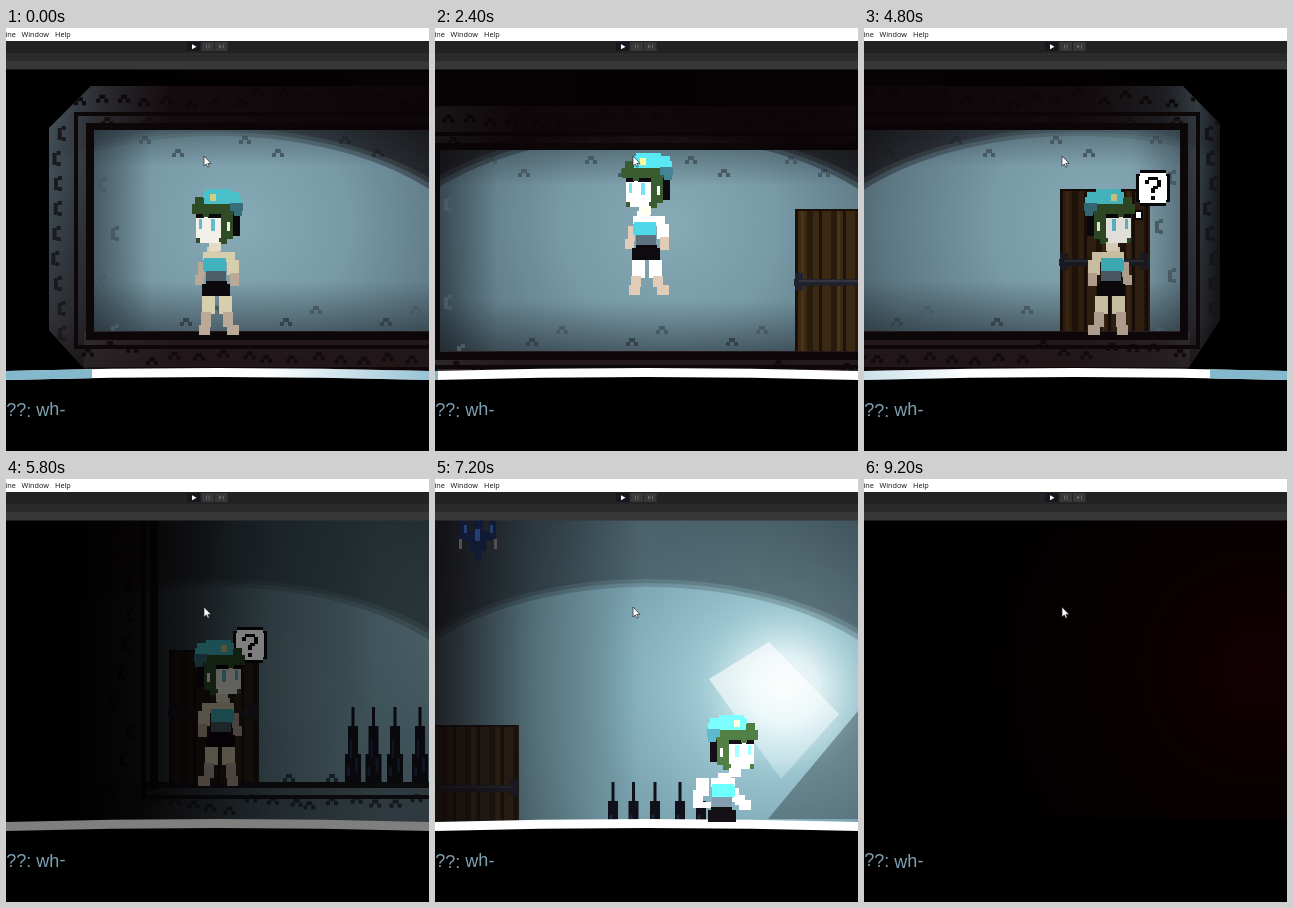
Animation of 423 by 423 pixels, one loop 9400 ms. Source, as an HTML page with a canvas:

```html
<!DOCTYPE html>
<html lang="en">
<head>
<meta charset="utf-8">
<style>
  html, body { margin: 0; width: 100%; height: 100%; overflow: hidden; background: #000; }
  canvas, svg { position: absolute; left: 0; top: 0; width: 423px; height: 423px; }
  .menu { font: 7.3px "Open Sans", sans-serif; fill: #111; }
  .talk { font: 18px "Liberation Sans", Arial, sans-serif; fill: #7f9fb1; }
</style>
</head>
<body>
<canvas id="stage" width="423" height="423"></canvas>
<svg viewBox="0 0 423 423">
  <rect width="423" height="13" fill="#fff"/>
  <g class="menu">
    <text x="-.5" y="9">ine</text><text x="15.5" y="9">Window</text><text x="49" y="9">Help</text>
  </g>
  <rect y="13" width="423" height="12" fill="#222"/>
  <rect y="25" width="423" height="8" fill="#2b2b2b"/>
  <rect y="33" width="423" height="8.5" fill="#373737"/>
  <path d="M181 14h13v9h-13z" fill="#17171f"/>
  <path d="M195.500 14h12.500v9h-12.500zM209 14h12.500v9h-12.500z" fill="#383838"/>
  <path d="M186 16.300l4.500 2.500-4.500 2.500z" fill="#fff"/>
  <path d="M200 16.500h1v4h-1zM202.500 16.500h1v4h-1zM213 16.500l3 2-3 2zM217 16.500h1v4h-1z" fill="#666"/>
  <text id="talk" class="talk" x="0.300" y="388">??: wh-</text>
  <path d="M198 128v10l2.300-2 1.500 3.200 1.500-.7-1.500-3.100h3.200z" fill="#fff" stroke="#222" stroke-width=".7"/>
</svg>
<script>
const LOOP = 9400, STEP = 200, SIZE = 423;
const ctx = document.getElementById('stage').getContext('2d');
const talk = document.getElementById('talk');
const clamp = v => Math.max(0, Math.min(1, v));
const noise = n => { const s = Math.sin(n * 127.1 + 11.7) * 43758.5; return s - Math.floor(s); };

// linear keys: time, value, time, value...
function key(t, ...k) {
  if (t <= k[0]) return k[1];
  for (let i = 2; i < k.length; i += 2)
    if (t <= k[i]) return k[i - 1] + (k[i + 1] - k[i - 1]) * (t - k[i - 2]) / (k[i] - k[i - 2]);
  return k[k.length - 1];
}

// filled boxes: x, y, w, h, repeated
function box(color, ...n) {
  ctx.fillStyle = color;
  for (let i = 0; i < n.length; i += 4) ctx.fillRect(n[i], n[i + 1], n[i + 2], n[i + 3]);
}

function stops(g, list) {
  list.forEach(([at, color]) => g.addColorStop(at, color));
  return g;
}
const across = (x0, x1, ...list) => stops(ctx.createLinearGradient(x0, 0, x1, 0), list);
const down = (y0, y1, ...list) => stops(ctx.createLinearGradient(0, y0, 0, y1), list);
const glow = (x, y, r, ...list) => stops(ctx.createRadialGradient(x, y, 0, x, y, r), list);

function poly(color, ...p) {
  ctx.fillStyle = color;
  ctx.beginPath();
  for (let i = 0; i < p.length; i += 2) ctx.lineTo(p[i], p[i + 1]);
  ctx.fill();
}

function brick(x, y, color) {
  box(color, x - 3, y - 4, 6, 4, x - 6, y, 4, 4, x + 2, y, 4, 4);
}

function sideBrick(x, y, color) {
  box(color, x - 4, y - 6, 4, 12, x, y - 8, 4, 4, x, y + 3, 4, 4);
}

// darkness above the wide oval of light
function shade(left, right, tint) {
  for (const k of [1, 0.975, 0.95]) {
    ctx.fillStyle = across(0, SIZE, [0, `rgba(${tint},${left})`], [0.5, `rgba(${tint},${(left + right) * 0.35})`],
      [1, `rgba(${tint},${right})`]);
    ctx.beginPath();
    ctx.rect(0, 40, SIZE, 310);
    ctx.ellipse(212, 257, 290 * k, 157 * k, 0, 0, 7);
    ctx.fill('evenodd');
  }
}

function door(x, floor, h, dim) {
  const y = floor - h;
  box('#3f2b15', x, y, 88, h);
  for (let i = 0; i < 8; i++) box(i % 2 ? '#2a1b0d' : '#1e130a', x + i * 12, y, i % 2 ? 6 : 3, h);
  box('#4e3719', x + 6, y, 3, h, x + 42, y, 3, h, x + 67, y, 3, h);
  box('#1b1009', x, y, 88, 2, x, y, 2, h, x + 86, y, 2, h);
  const m = floor - 69;
  box('#24242e', x - 1, m - 3, 90, 7, x, m - 9, 8, 17, x + 80, m - 9, 8, 17);
  box('#363945', x + 4, m - 2, 80, 2);
  box(`rgba(8,2,3,${dim})`, x, y, 88, h);
}

function firstRoom(L, C) {
  const T = 102 + C, F = 303 + C, R = L + 475;
  ctx.save();
  ctx.beginPath();
  [[-45, -2], [-3, -44], [478, -44], [515, -6], [515, 190], [478, 246], [-3, 246], [-45, 200]]
    .forEach(([x, y]) => ctx.lineTo(L + x, T + y));
  ctx.clip();
  box(across(L - 45, R + 40, [0, '#4a5a63'], [0.1, '#303238'], [0.22, '#190e11'], [0.75, '#170d10'],
    [0.9, '#23252a'], [0.96, '#3b474e'], [1, '#181c20']), L - 45, T - 44, 560, 290);
  box(down(T - 44, F + 44, [0, 'rgba(0,0,0,0)'], [0.35, 'rgba(0,0,0,.15)'], [0.8, 'rgba(18,4,6,.45)'],
    [1, 'rgba(12,3,4,.75)']), L - 45, T - 44, 560, 290);
  box('rgba(94,84,88,.22)', L - 10, F, 495, 36);

  for (let i = 0; i < 24; i++) {
    const x = L - 20 + i * 23 + noise(i) * 8;
    brick(x, T - 25 - noise(i + 40) * 14, '#100a0d');
    brick(x + 8, F + 13 + noise(i + 80) * 20, '#120b0e');
    if (i % 2) brick(x + 5, T - 9, '#1a1114');
  }
  for (let i = 0; i < 9; i++) {
    sideBrick(L - 29 - noise(i + 9) * 10, T + 4 + i * 25, '#1b1a1f');
    sideBrick(R + 27 + noise(i + 5) * 8, T + 4 + i * 25, '#15151a');
  }
  ctx.strokeStyle = '#0d0709';
  ctx.lineWidth = 8;
  ctx.strokeRect(L - 4, T - 3, 483, 209);
  ctx.lineWidth = 4;
  ctx.strokeRect(L - 18, T - 16, 511, 233);

  ctx.save();
  ctx.beginPath();
  ctx.rect(L, T, 475, F - T);
  ctx.clip();
  box(glow(235, 195, 310, [0, '#87aab7'], [0.35, '#7899a6'], [0.7, '#5b7682'], [1, '#35434b']), L, T, 475, F - T);
  box(down(T, F, [0, 'rgba(15,22,28,.3)'], [0.18, 'rgba(15,22,28,0)'], [0.75, 'rgba(15,22,28,0)'],
    [1, 'rgba(15,18,24,.42)']), L, T, 475, F - T);
  box(across(L, R, [0, 'rgba(15,20,26,.42)'], [0.12, 'rgba(15,20,26,0)'], [0.9, 'rgba(15,20,26,0)'],
    [1, 'rgba(15,20,26,.3)']), L, T, 475, F - T);
  const mark = '#485a64';
  for (let i = 0; i < 5; i++) {
    brick(L + 51 + i * 100, T + 10, mark);
    brick(L + 84 + i * 100, T + 23, mark);
    brick(L + 92 + i * 100, F - 9, '#36424a');
    brick(L + 122 + i * 100, F - 21, mark);
  }
  for (let i = 0; i < 4; i++) {
    const x = i % 2 ? 21 : 8;
    sideBrick(L + x, T + 55 + i * 49, mark);
    sideBrick(R - x, T + 48 + i * 49, mark);
  }
  ctx.restore();
  door(L + 355, F, 142, key(L, -159, 0.3, -20, 0.05));
  ctx.restore();
  shade(0.36 * clamp((60 - L) / 60), 0.36 * clamp((L + 160) / 100), '10,3,5');
}

function lamp(x, y) {
  box('#111a35', x - 5, y - 40, 10, 26, x - 18, y - 38, 7, 18, x + 11, y - 38, 7, 18,
    x - 14, y - 28, 28, 10, x - 8, y - 18, 16, 10, x - 3, y - 8, 6, 10);
  box('#243f70', x - 3, y - 30, 5, 12, x - 14, y - 34, 3, 8, x + 12, y - 34, 3, 8);
  box('#55504f', x - 19, y - 20, 3, 10, x + 16, y - 20, 3, 10);
}

function secondRoom(D, C) {
  const F = 303 + C;
  box(glow(270, 205, 330, [0, '#84adb9'], [0.5, '#78a0ad'], [1, '#587782']), 0, 40, SIZE, 312);
  box('#5d747e', 0, F, SIZE, 60);
  for (let i = 0; i < 30; i++) brick(D - 20 + i * 20 + noise(i) * 9, F + 12 + noise(i + 30) * 21, '#2b3238');
  box('#16151a', D - 28, F, 720, 6, D - 28, F + 13, 720, 4);
  for (let i = 0; i < 7; i++) brick(D + 120 + i * 43, F - 4, '#37474e');
  box('#090608', D - 28, -60 + C, 5, 382, D - 19, -60 + C, 8, 371);
  for (let i = 0; i < 11; i++) sideBrick(D - 38 - noise(i) * 22, 20 + C + i * 29, '#211d20');
  door(D, F, 132, 0.12);
  poly('#66838f', D + 339, 265 + C, D + 429, 157 + C, D + 620, 157 + C, D + 620, 265 + C);
  box(glow(D + 356, 135 + C, 190, [0, 'rgba(255,255,255,.95)'], [0.18, 'rgba(242,255,255,.85)'],
    [0.45, 'rgba(185,229,237,.5)'], [1, 'rgba(150,205,218,0)']), 0, 40, SIZE, 312);
  poly(down(130 + C, 260 + C, [0, 'rgba(255,255,255,.6)'], [0.6, 'rgba(235,252,255,.4)'], [1, 'rgba(220,245,250,0)']),
    D + 280, 125 + C, D + 340, 88 + C, D + 410, 160 + C, D + 352, 225 + C);
  poly('rgba(60,80,90,.45)', D + 339, 265 + C, D + 429, 157 + C, D + 620, 157 + C, D + 620, 265 + C);
  shade(0.28, 0.2, '16,18,22');
  box(across(D - 100, D + 210, [0, 'rgba(3,0,1,1)'], [0.22, 'rgba(8,2,4,.92)'], [0.42, 'rgba(13,9,12,.7)'],
    [0.65, 'rgba(15,18,22,.35)'], [1, 'rgba(15,18,22,0)']), 0, 40, SIZE, 312);
  lamp(D + 49, 5 + C);
  for (const at of [184, 204.5, 226, 251, 272]) {
    const x = D + at;
    box('#10111b', x - 1.5, F - 75, 3, 22, x - 5, F - 56, 10, 28, x - 8, F - 28, 16, 28);
    box('#1c2b47', x - 3, F - 42, 2, 18, x + 2, F - 24, 3, 14, x - 6, F - 15, 3, 9);
  }
}

function bubble(x, y) {
  box('#08080b', x + 4, y, 26, 36, x, y + 4, 34, 28);
  box('#fff', x + 4, y + 3, 26, 30, x + 3, y + 6, 28, 24);
  box('#08080b', x + 12, y + 7, 10, 3, x + 9, y + 10, 4, 4, x + 21, y + 10, 4, 7,
    x + 17, y + 16, 5, 3, x + 15, y + 18, 4, 5, x + 15, y + 26, 4, 4);
  box('#08080b', x - 2, y + 40, 9, 10);
  box('#fff', x, y + 42, 5, 6);
}

// drawn facing left, the feet at the given point
function hero(x, feet, dir, pose, light) {
  const skin = '#f0e8d2', tan = '#c5b2a0', ink = '#0d0a0e', hair = '#32502a';
  const cream = light > 1 ? '#f3efe2' : '#e3d9b8';
  ctx.save();
  ctx.beginPath();
  ctx.rect(0, 42, SIZE, 307);
  ctx.clip();
  ctx.filter = `brightness(${light})`;
  ctx.translate(Math.round(x), Math.round(feet) - 85);
  ctx.scale(dir, 1);

  const run = pose === 'run';
  if (run) {
    box(tan, 4, 46, 16, 10, 12, 56, 16, 10, 22, 66, 14, 10, 30, 76, 14, 10,
      -14, 44, 15, 14, -20, 56, 15, 14, -18, 68, 12, 12, -22, 78, 13, 3);
    box(tan, 12, 2, 13, 18, 18, 14, 10, 18, 10, 26, 12, 6);
    box(tan, -18, 12, 8, 14, -24, 19, 10, 10, -30, 24, 12, 10);
  } else {
    const s = pose === 'step' ? 5 : 0, low = pose === 'jump' ? 17 : 21;
    box(cream, -15 + s, 46, 13, 18, 2 - s, 46, 13, 18);
    box(tan, -16 + s, 62, 10, low - 6, -18 + s, 60 + low - 6, 11, 10, 6 - s, 62, 10, low - 6, 10 - s, 60 + low - 6, 12, 10);
    box(tan, -19, 12, 7, 15, -22, 25, 9, 10);
    box(cream, 4, 2, 14, 10, 10, 10, 12, 15);
    box(tan, 13, 23, 9, 13);
  }
  box(cream, -10, -3, 13, 8, -14, 2, 24, 9);
  box('#45bdca', -13, 8, 22, 14, -14, 10, 4, 10);
  box('#52636e', -11, 21, 20, 11);
  box(ink, -11, 31, 21, 4, -15, 34, 28, 12);

  ctx.translate(run ? -12 : 0, -61);
  box(ink, 12, 22, 11, 20, 15, 40, 8, 7, 10, 44, 5, 6);
  box(hair, -22, 8, 40, 8, -25, 15, 49, 10, 3, 23, 13, 27, -1, 47, 11, 8);
  box('#4dcbd5', -11, 0, 25, 4, -14, 3, 37, 6, -13, 8, 38, 7);
  box('#3b7481', 13, 14, 13, 8, 17, 21, 8, 6);
  box('#dcda8c', -7, 5, 6, 7);
  box(skin, -8, 53, 12, 9);
  box('#fffdf6', -21, 27, 25, 22, -18, 48, 20, 6, 10, 33, 3, 9);
  box(ink, -21, 25, 8, 4, -9, 25, 13, 4);
  box('#67c5d7', -18, 30, 3, 10, -6, 30, 4, 12);
  box(hair, -21, 49, 4, 5, -14, 23, 6, 5);
  ctx.restore();
}

function ledge(L, first) {
  box('#000', 0, 349, SIZE, 80);
  ctx.beginPath();
  ctx.moveTo(0, 343);
  ctx.quadraticCurveTo(211, 337, SIZE, 343);
  ctx.lineTo(SIZE, 352);
  ctx.quadraticCurveTo(211, 346, 0, 352);
  ctx.fillStyle = '#fff';
  ctx.fill();
  if (!first) return;
  ctx.save();
  ctx.clip();
  box('#83b8cd', 0, 338, Math.max(0, L - 2), 16, L + 505, 338, 500, 16);
  const tint = a => `rgba(125,180,202,${a})`;
  box(across(0, SIZE, [0, tint(0.4 * clamp((-100 - L) / 59))], [0.25, tint(0)], [0.62, tint(0)],
    [1, tint(0.8 * clamp((L - 20) / 68))]), 0, 338, SIZE, 16);
  ctx.restore();
}

function draw(t) {
  const first = t < 5400;
  const odd = t / STEP % 2;
  const C = key(t, 2000, 0, 2400, 20, 2600, 42, 2800, 48, 3000, 30, 3200, 20, 3400, 42, 3600, 50, 3800, 35, 4200, 0,
    6400, 0, 6600, 25, 6800, 58, 7000, 78, 7200, 75, 7600, 40, 8000, 15);
  const h = key(t, 2000, 0, 2400, 56, 2600, 78, 2800, 52, 3000, 0, 3200, 40, 3400, 72, 3600, 37, 3800, 0,
    6400, 0, 6600, 62, 6800, 95, 7000, 66, 7200, 0);
  const light = key(t, 0, 0.95, 2400, 1.15, 3600, 1.12, 4800, 0.88, 5600, 0.75, 6400, 0.85, 7200, 1.6);
  const L = key(t, 0, 88, 600, 110, 1800, -10, 2400, 5, 2800, 30, 3600, 16, 4400, -150, 4800, -159);
  const D = key(t, 5400, 168, 6200, 158, 6400, 133, 7200, -6, 7600, -50);
  const x = first
    ? key(t, 0, 211, 600, 198, 1200, 225, 2000, 225, 2400, 212, 2800, 200, 3600, 240, 4200, 250, 4800, 246)
    : key(t, 5400, 212, 6200, 216, 6400, 222, 7000, 280, 7200, 286, 7600, 270);
  const left = t <= 600 || (t > 2000 && t <= 2800);
  const walking = first && t > 0 && t < 4600;
  let pose = h > 0 ? 'jump' : walking && odd ? 'step' : 'stand';
  if (t >= 6200) pose = 'run';

  ctx.clearRect(0, 0, SIZE, SIZE);
  box('#000', 0, 0, SIZE, SIZE);
  if (first) firstRoom(L, C); else secondRoom(D, C);
  ledge(L, first);
  if (t >= 4200 && t <= 5200) bubble(L + 431, 142 + C);
  if (t >= 5600 && t <= 6600) bubble(D + 64, 148 + C);
  hero(x, 307 + C - h, left ? 1 : -1, pose, light);

  const fade = key(t, 4800, 0, 5200, 1, 5600, 1, 6000, 0, 7200, 0, 7400, 0.12, 7800, 0.55, 8200, 0.88, 8600, 1);
  box(`rgba(0,0,0,${fade})`, 0, 40, SIZE, 383);
  if (t > 7400) {
    ctx.globalAlpha = key(t, 7400, 0, 8200, 1);
    box(glow(395, 190, 330, [0, 'rgba(20,0,1,.9)'], [0.3, 'rgba(13,0,1,.8)'], [0.65, 'rgba(7,1,1,.6)'],
      [1, 'rgba(4,0,0,0)']), 0, 42, SIZE, 298);
    ctx.globalAlpha = 1;
  }

  const wave = i => i < 0 ? 0 : Math.sin(t / 190 + i * 0.9) * 0.6;
  talk.setAttribute('dy', [...talk.textContent].map((_, i) => (wave(i) - wave(i - 1)).toFixed(2)).join(' '));
}

function tick(now) {
  draw(Math.floor(now % LOOP / STEP) * STEP);
  requestAnimationFrame(tick);
}
draw(0);
requestAnimationFrame(tick);
</script>
</body>
</html>
```
